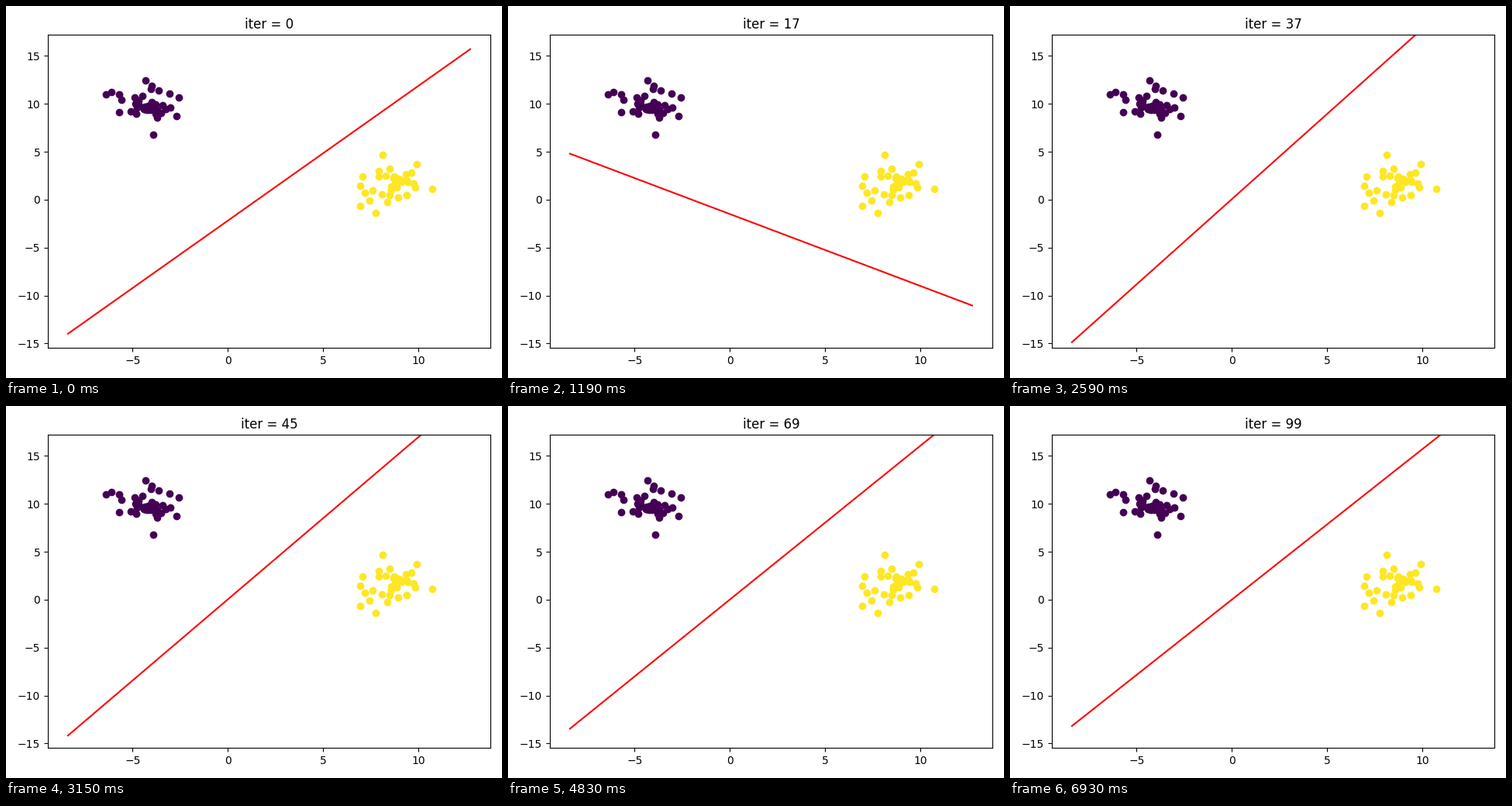
Recreate the animation shown at these times as a matplotlib script. Size 640x480 px, loop 7 s.

```python
import numpy as np
import matplotlib.pyplot as plt
from matplotlib.animation import FuncAnimation

FRAMES = 100
X_SPAN = np.array([-8.4, 12.72])

# Outlying points of each cluster; the dense core is drawn at random.
LEFT_RIM = [
    (-6.41, 11.0), (-6.12, 11.2), (-5.71, 11.0), (-5.59, 10.4), (-5.71, 9.1),
    (-4.9, 10.65), (-4.51, 10.8), (-4.33, 12.45), (-4.0, 11.9), (-4.05, 11.55),
    (-3.64, 11.4), (-3.05, 11.05), (-2.58, 10.65), (-3.03, 9.6), (-2.7, 8.75),
    (-3.72, 8.55), (-3.92, 6.78), (-4.8, 8.95), (-5.1, 9.25),
]
RIGHT_RIM = [
    (8.14, 4.67), (7.05, 2.4), (6.96, 1.43), (7.19, 0.7), (7.6, 0.95),
    (7.43, -0.1), (6.96, -0.67), (7.74, -1.36), (8.08, 0.6), (8.35, -0.25),
    (8.47, 0.5), (8.95, 0.2), (9.39, 0.45), (8.57, 1.4), (8.47, 3.2),
    (7.9, 3.0), (7.9, 2.4), (8.3, 2.5), (9.91, 3.7), (9.63, 2.85),
    (9.83, 1.25), (10.73, 1.15),
]


def cluster(rim, center, spread, count, rng):
    core = rng.normal(center, spread, (count, 2))
    return np.vstack([rim, core]).T


def weights(t):
    """Weights of the separating line w1*x + w2*y + b = 0 at step t."""
    if t <= 17:
        p = (t / 17) ** 2
        return -0.71 + 1.26 * p, 0.505 + 0.228 * p
    if t < 20.2:
        keys = [17, 18.9, 20.2]
        return np.interp(t, keys, [0.55, 2.4, 4.43]), np.interp(t, keys, [0.733, 1.07, 0])
    u = t - 20.2
    return 4.43 + 1.514 * u, -u


def boundary(t, bias=1.1):
    w1, w2 = weights(t)
    return -(w1 * X_SPAN + bias) / w2


rng = np.random.default_rng(4)
fig, ax = plt.subplots(figsize=(6.4, 4.8), dpi=100)
ax.scatter(*cluster(LEFT_RIM, (-4.1, 9.65), (0.4, 0.32), 26, rng), color="#440154")
ax.scatter(*cluster(RIGHT_RIM, (9.1, 1.75), (0.32, 0.38), 18, rng), color="#fde725")
line, = ax.plot(X_SPAN, boundary(0), "r-")
title = ax.set_title("iter = 0")
fig.tight_layout()


def update(i):
    line.set_ydata(boundary(i))
    title.set_text(f"iter = {i}")
    return line, title


anim = FuncAnimation(fig, update, frames=FRAMES, interval=70,
                     repeat=True, repeat_delay=0, blit=False)
plt.show()
```
